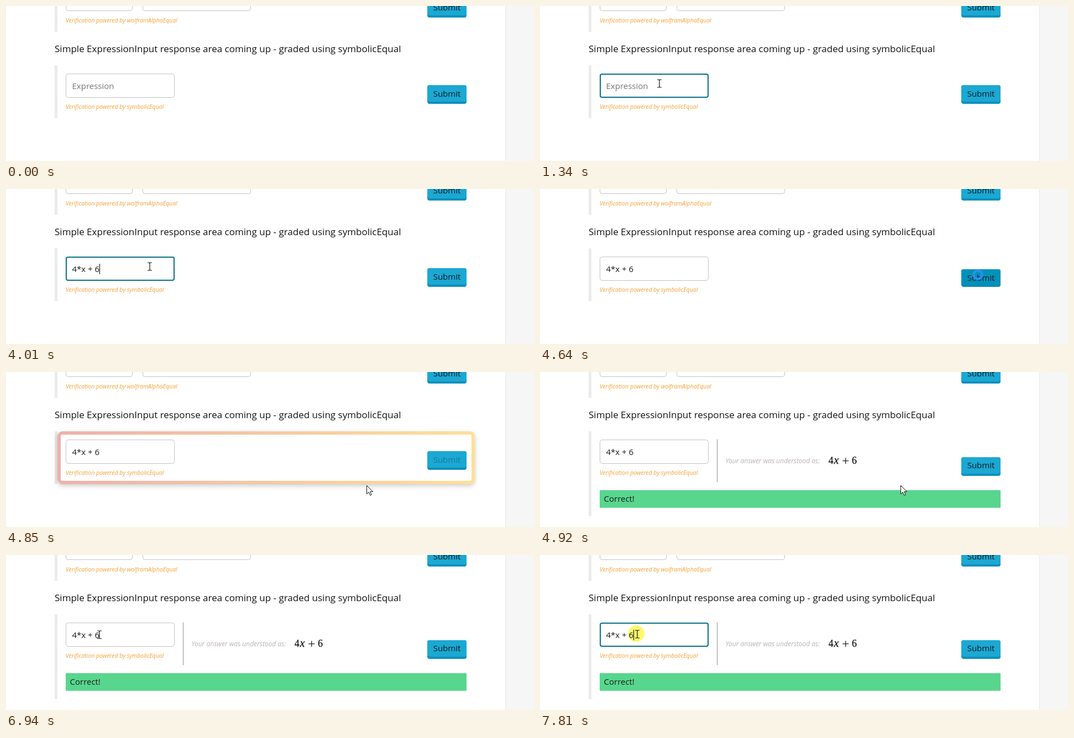
Recreate the animation shown at these times as an HTML page. Size 955 by 282 pixels, loop 8 s.

```html
<!DOCTYPE html>
<html lang="en">
<head>
<meta charset="utf-8">
<title>Expression input</title>
<style>
  html, body { margin: 0; width: 100%; height: 100%; overflow: hidden; background: #fff; }
  svg { display: block; width: 955px; height: 282px; }
  text { font: 15px "Open Sans", sans-serif; fill: #1a1a1a; white-space: pre; }
  .title { font-size: 17px; fill: #111; }
  .note { font-size: 10.5px; font-style: italic; fill: #f5a033; }
  .hint { font-size: 12px; font-style: italic; fill: #bab0b0; }
  .math text { font: 18px "Liberation Serif", serif; fill: #111; stroke: #111; stroke-width: .25; }
  .math .var { font-size: 20px; font-style: italic; }
  .math .op { font-size: 24px; stroke: none; }
  .bar { fill: #ebebeb; }
  .field { fill: #fff; stroke: #c2c2c2; }
  .btn text { text-anchor: middle; fill: #0d1a22; }
  .face { fill: #1ba8d2; }
  .edge { fill: #0b90bd; }
  #glow { filter: drop-shadow(0 3px 4px rgba(0, 0, 0, .2)); }
</style>
</head>
<body>
<svg viewBox="0 0 955 282">
  <defs>
    <linearGradient id="warm"><stop stop-color="#efb0aa"/><stop offset="1" stop-color="#fde09a"/></linearGradient>
  </defs>
  <rect x="903" width="52" height="282" fill="#f6f6f6"/>
  <rect x="903" width="1" height="282" fill="#e9e9e9"/>

  <rect class="bar" x="88" width="5" height="47"/>
  <rect class="field" x="108.5" y="-33.5" width="120" height="42" rx="4"/>
  <rect class="field" x="247.5" y="-33.5" width="195" height="42" rx="4"/>
  <text class="note" x="108" y="30">Verification powered by wolframAlphaEqual</text>
  <g class="btn">
    <rect class="edge" x="762" y="-13" width="71" height="34" rx="4"/>
    <rect class="face" x="762" y="-13" width="71" height="30" rx="4"/>
    <text x="797.5" y="8">Submit</text>
  </g>

  <text class="title" x="88" y="84">Simple ExpressionInput response area coming up - graded using symbolicEqual</text>

  <rect class="bar" id="bar" x="88" y="108" width="5" height="96"/>
  <rect id="glow" x="96" y="111" width="749" height="90" rx="6" fill="#fff" stroke="url(#warm)" stroke-width="6"/>
  <rect class="field" id="field" x="108.5" y="123.5" width="196" height="43" rx="4"/>
  <rect id="focus" x="109" y="124" width="195" height="42" rx="3" fill="#fff" stroke="#0b6e8b" stroke-width="2"/>
  <circle id="spot" r="15" fill="#fcf96e"/>
  <text id="value" x="119.5" y="151"></text>
  <rect id="caret" y="136" width="1" height="19" fill="#000"/>
  <text class="note" x="108" y="187">Verification powered by symbolicEqual</text>

  <g id="result">
    <path d="M320.5 123V200" stroke="#222" stroke-dasharray="1 1"/>
    <text class="hint" x="335.5" y="166">Your answer was understood as:</text>
    <g class="math">
      <text x="521.8" y="167">4</text>
      <text class="var" x="531.5" y="167">x</text>
      <text class="op" x="546" y="168.6">+</text>
      <text x="564" y="167">6</text>
    </g>
    <rect x="108" y="215" width="725" height="32" fill="#58d68d"/>
    <text x="115.5" y="236">Correct!</text>
  </g>

  <g class="btn">
    <rect class="edge" id="edge" x="762" width="71" rx="4"/>
    <rect class="face" id="face" x="762" height="30" width="71" rx="4"/>
    <text id="label" x="797.5">Submit</text>
  </g>

  <g id="pointer">
    <path id="arrow" d="M.5 .5V16L4.2 12.6L6.7 18.4L9.2 17.3L6.7 11.7H11.7Z" fill="#fff" stroke="#111"/>
    <path id="beam" d="M-4 -7H-1L0 -6L1 -7H4M0 -6V6M-4 7H-1L0 6L1 7H4" fill="none" stroke="#111" stroke-width="1.2"/>
    <path id="hand" d="M-1.5 0C-1.5 -2 1.5 -2 1.5 0V6L8 7.5C10 8 10 10 9.5 12L8 18H0L-5 11C-6 9 -4 8 -1.5 10Z" fill="#fff" stroke="#111"/>
    <circle id="ring" r="7.5" fill="none" stroke="#2791ee" stroke-width="4.5"/>
  </g>
</svg>
<script>
const LOOP = 8000, STEP = 70;
const $ = id => document.getElementById(id);
const show = (id, on) => { $(id).style.display = on ? '' : 'none'; };
const set = (id, attrs) => { for (const k in attrs) $(id).setAttribute(k, attrs[k]); };
const within = (t, a, b) => t >= a && t < b;

// Pointer trips: rows of [time, x, y]; the pointer rests after each trip.
const trips = [
  [[200, 566, 39], [410, 400, 160], [550, 279, 213], [690, 218, 143], [760, 216, 141]],
  [[4010, 260, 141], [4080, 340, 144], [4290, 650, 155], [4500, 792, 156], [4640, 792, 156],
   [4710, 745, 185], [4780, 655, 206], [4850, 652, 206]],
  [[6180, 624, 203], [6250, 550, 190], [6460, 290, 152], [6600, 180, 145], [6670, 163, 145]],
  [[6870, 166, 145], [7080, 176, 144]]
];

// [time, number of typed characters, caret x]
const answer = '4*x + 6';
const typing = [[0, 0, 120], [1870, 1, 128], [2220, 2, 136], [2620, 3, 144],
  [2820, 4, 148], [3220, 5, 157], [3420, 6, 161], [3680, 7, 169]];

const latest = (rows, t, time) => rows.filter(r => time(r) <= t).pop();

function pointerAt(t) {
  const trip = latest(trips, t, r => r[0][0]);
  if (!trip) return null;
  const start = trip[0][0];
  const s = start + Math.floor((t - start) / STEP) * STEP;
  const i = trip.findIndex(k => k[0] > s);
  if (i < 0) return trip[trip.length - 1].slice(1);
  const a = trip[i - 1], b = trip[i], p = (s - a[0]) / (b[0] - a[0]);
  return [1, 2].map(n => a[n] + (b[n] - a[n]) * p);
}

function drawPointer(t) {
  const at = pointerAt(t);
  show('pointer', at);
  if (!at) return;
  const [x, y] = at;
  const kind = within(t, 4640, 4710) ? 'ring'
    : x > 108 && x < 305 && y > 123 && y < 167 ? 'beam'
    : x > 762 && x < 833 && y > 144 && y < 178 ? 'hand' : 'arrow';
  ['arrow', 'beam', 'hand', 'ring'].forEach(k => show(k, k === kind));
  set('pointer', { transform: `translate(${Math.round(x)} ${Math.round(y)})` });
  set('spot', { cx: x - 2, cy: y - 1 });
}

function drawField(t) {
  const [, count, x] = latest(typing, t, r => r[0]);
  const focused = within(t, 810, 4570) || t >= 7740;
  $('value').textContent = count ? answer.slice(0, count) : 'Expression';
  $('value').style.fill = count ? '' : '#767676';
  set('caret', { x });
  show('focus', focused);
  show('caret', focused && !within(t, 1340, 1870));
  show('spot', within(t, 740, 880) || t >= 7740);
}

function drawButton(t) {
  const down = within(t, 4570, 4710), hover = within(t, 4430, 4710), done = t >= 4920;
  const y = done ? 155 : down ? 146 : 144;
  set('edge', { y, height: down ? 32 : 34 });
  set('face', { y });
  $('edge').style.fill = hover ? '#0784ad' : '';
  $('face').style.fill = hover ? '#0091bb' : '';
  set('label', { y: done ? 175 : y + 21, 'fill-opacity': within(t, 4710, 4920) ? .3 : 1 });
}

function draw(t) {
  const done = t >= 4920;
  show('glow', within(t, 4710, 4920));
  set('glow', { opacity: t < 4780 ? .6 : 1 });
  show('result', done);
  set('bar', { height: done ? 154 : 96 });
  drawField(t);
  drawButton(t);
  drawPointer(t);
}

function tick() {
  draw(performance.now() % LOOP);
  requestAnimationFrame(tick);
}
tick();
</script>
</body>
</html>
```
